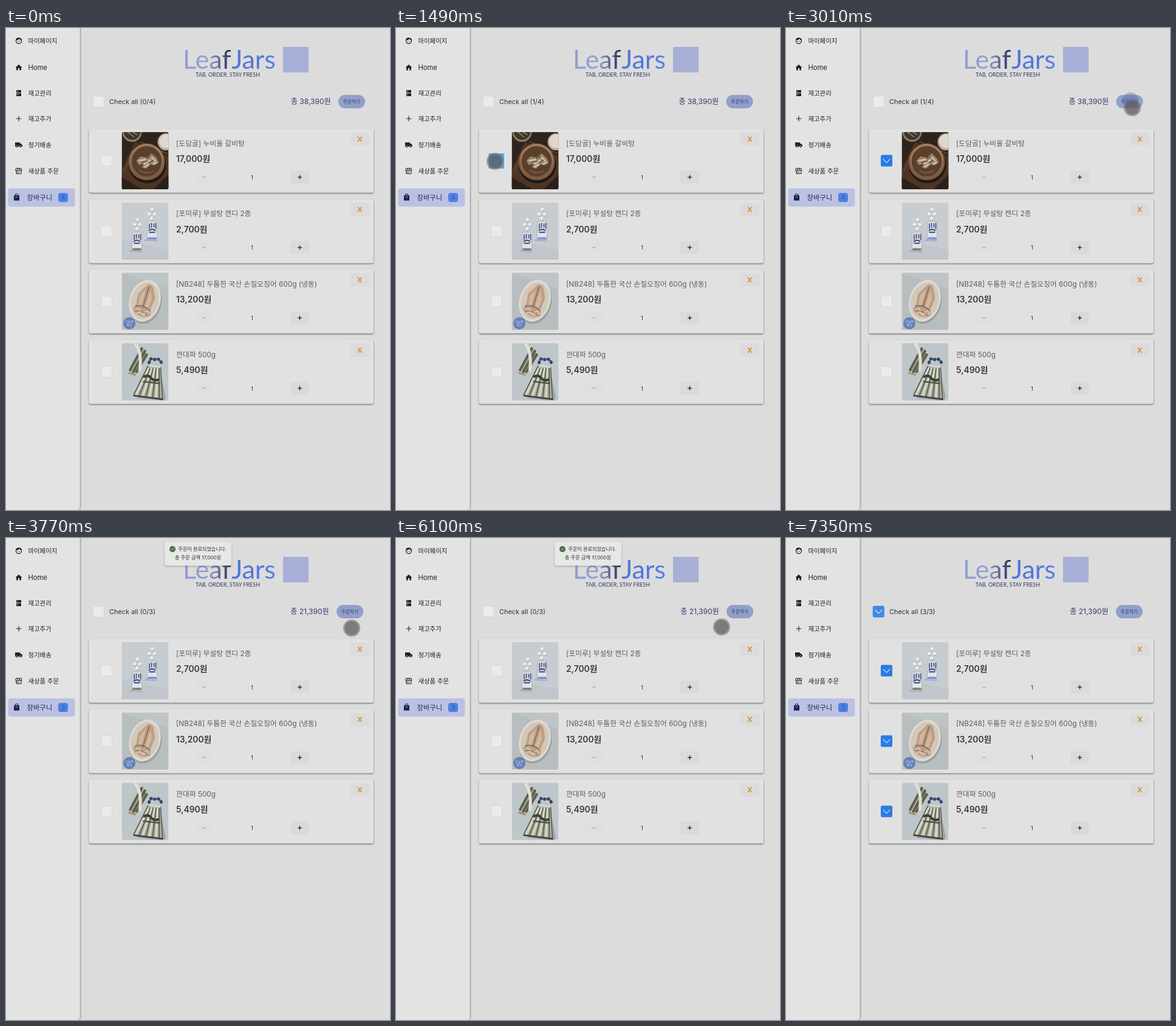
An HTML page for the animation above (8 s loop, 632 by 792 pixels).

```html
<!DOCTYPE html>
<html lang="ko">
<head>
<meta charset="utf-8">
<title>Cart</title>
<style>
  html, body { margin: 0; width: 100%; height: 100%; overflow: hidden; background: #dcdcdc; }
  svg { display: block; width: 100%; height: 100%; }
  text { font-family: Inter, "Noto Sans CJK KR", "Noto Sans CJK", sans-serif; }
  .brand { font-family: Lato, sans-serif; }
  .mid { text-anchor: middle; }
  .line { fill: none; stroke-linecap: round; stroke-linejoin: round; }
</style>
</head>
<body>
<svg id="stage" viewBox="0 0 632 792" xmlns="http://www.w3.org/2000/svg"></svg>
<script>
const LOOP = 8000;
const CHECK_ONE = 1455, ORDER = 3150, TOAST_OUT = 6150, CHECK_ALL = 6560;

const text = (x, y, size, fill, content, extra = '') =>
  `<text x="${x}" y="${y}" font-size="${size}" fill="${fill}" ${extra}>${content}</text>`;
const rect = (x, y, w, h, fill, r = 0, extra = '') =>
  `<rect x="${x}" y="${y}" width="${w}" height="${h}" rx="${r}" fill="${fill}" ${extra}/>`;
const circle = (x, y, r, fill, extra = '') =>
  `<circle cx="${x}" cy="${y}" r="${r}" fill="${fill}" ${extra}/>`;
const path = (d, stroke, width, extra = '') =>
  `<path class="line" d="${d}" stroke="${stroke}" stroke-width="${width}" ${extra}/>`;
const shape = (d, fill) => `<path d="${d}" fill="${fill}" fill-rule="evenodd"/>`;
const group = (x, y, content, turn = 0) =>
  `<g transform="translate(${x} ${y}) rotate(${turn})">${content}</g>`;

const checkbox = (x, y, name, fill) =>
  rect(x, y, 18, 18, '#ebebeb', 2, 'stroke="#d2d2d2" stroke-width=".8"') +
  `<g id="${name}">${rect(x - .5, y - .5, 19, 19, fill, 2.5)}` +
  path(`M${x + 3.5} ${y + 6.5}l5.5 5.5 5.5-5.5`, '#cfe0f6', 1.2) + '</g>';

// Sidebar icons, each centred on the origin.
const INK = '#222';
const wheel = x => circle(x, 3, 1.6, INK, 'stroke="#e2e2e2" stroke-width=".6"');
const icons = {
  face: circle(0, 0, 4.6, 'none', `stroke="${INK}" stroke-width="1.2"`) +
    shape('M-4.5-1Q0-1 1-3.5Q2-1 4.5-1V-3L1-5H-2L-4.5-3Z', INK) +
    circle(-1.7, 1, .7, INK) + circle(1.7, 1, .7, INK),
  home: shape('M-5.5 0L0-5L5.5 0H4V4.5H1.2V1H-1.2V4.5H-4V0Z', INK),
  fridge: shape('M-4-5H4V-.8H-4ZM-4 .2H4V5H-4ZM-2.5-3.8V-2H-1.5V-3.8ZM-2.5 1.2V3.2H-1.5V1.2Z', INK),
  plus: path('M-4 0H4M0-4V4', INK, 1.1),
  truck: shape('M-6-4H2V-2H4L6 .5V3H-6Z', INK) + wheel(-3) + wheel(3),
  store: path('M-4-4.5H4L5-1H-5ZM-4-1V4.5H4V-1M-1.5-4V-1M1.5-4V-1M-4 2H1', INK, 1),
  bag: shape('M-4.5-3H4.5V5.5H-4.5Z', '#1d2347') + path('M-2-3V-4.5Q0-6.5 2-4.5V-3', '#1d2347', 1.2) +
    path('M-2-1Q0 2 2-1', '#bbc1e3', .9),
};

const sidebar = () => {
  const items = [['face', '마이페이지', 21], ['home', 'Home', 65], ['fridge', '재고관리', 107],
    ['plus', '재고추가', 149], ['truck', '정기배송', 192], ['store', '새상품 주문', 235]];
  return rect(-10, -10, 131.5, 802, '#e3e3e3', 5, 'filter="url(#sideShadow)"') +
    items.map(([icon, label, y]) => group(21, y, icons[icon]) +
      (label === 'Home' ? text(36.5, y + 4, 11.2, INK, label)
        : text(36.5, y + 4, 10.4, INK, label, 'font-weight="500"'))).join('') +
    rect(3.5, 263.5, 110, 30, '#bbc1e3', 4) + group(17.5, 278, icons.bag) +
    text(34.5, 282.5, 11.3, '#252b55', '장바구니', 'font-weight="500"') +
    rect(86, 271, 16, 15, '#4d80e4', 4) +
    text(94, 282.2, 10, '#2f559f', '4', 'id="badge" class="mid"');
};

const header = () =>
  text(291, 67, 43, 'url(#leaf)', 'Leaf', 'class="brand"') +
  text(444, 67, 43, 'url(#jars)', 'Jars', 'class="brand" text-anchor="end"') +
  text(365, 80, 9, '#34385c', 'TAB, ORDER, STAY FRESH', 'class="brand mid"') +
  rect(456, 31, 42, 42, '#a7afd6') +
  checkbox(143.3, 112, 'allMark', '#3d89e6') +
  text(170, 125, 10.9, '#303030', '', 'id="count"') +
  `<g id="order">${text(-12.5, 125, 12, '#323d6c', '', 'id="total" text-anchor="end"')}` +
  rect(0, 110, 44, 22, '#919fca', 11) +
  text(22, 124, 7.7, '#303c6b', '주문하기', 'class="mid"') + '</g>';

// Product pictures, 77 by 94 each.
const can = (x, y, rim) => group(x, y,
  shape('M-8 13L-14 17L8 18V13Z', '#a9afb7') +
  rect(-8, -15, 16, 31, '#e2e4e9', 3, 'stroke="#a4abb8" stroke-width=".8"') +
  rect(-7.5, -13, 15, 17, '#d3d8e6', 1) + path('M-4.5-11V-3M-1-12V-5M3-11V-6M6-12V-3', '#434c70', 1.6) +
  path('M-5 0Q0-4 5 0M-4 3H4', '#434c70', 2) + rect(-7.5, 11, 15, 4, rim, 2));

const candies = (x, y) => [[0, 0], [-5, 8], [4, 8], [-1, 15]]
  .map(([dx, dy]) => circle(x + dx + .6, y + dy + 1.4, 2.6, '#adb3ba') + circle(x + dx, y + dy, 2.5, '#eef0f2'))
  .join('');

const soup =
  rect(0, 0, 77, 94, '#2f241d') +
  shape('M0 94V62L22 16L77 40V94Z', '#4d3423') + shape('M0 94V74L34 94ZM52 94L77 70V94Z', '#2b201a') +
  path('M30 16L77 36M4 64L18 32', '#6c4b33', 1.5) +
  circle(17, 0, 16, '#8b7a66') + circle(17, -1, 13.5, '#3d342b') + path('M9-1L20 8M15-2L25 4', '#8f7f68', 1.8) +
  circle(73, 16, 14, '#b7aa98') + circle(73, 15, 11.5, '#ded8ce') +
  circle(42, 53, 31, '#211812') + circle(41, 49, 30, '#7d5b41') + circle(41, 46, 27, '#a07c5c') +
  circle(41, 48, 25, '#5a3f2d') +
  shape('M24 47L31 40L42 42L49 35L57 42L61 50L54 55L48 53L40 60L33 58L36 52L28 54Z', '#9c846a') +
  path('M29 47L39 45M37 52L47 46M49 41L55 47M38 57L44 53M52 52L57 50', '#d3c3aa', 2.6) +
  path('M33 50L42 48M45 50L52 46M41 43L48 40', '#66503c', 1.5) + path('M30 63Q40 70 52 64', '#7b5b41', 2);

const candy =
  rect(0, 0, 77, 94, '#c7ccd1') + shape('M0 94V60L77 78V94Z', '#c0c6cc') +
  candies(26, 28) + candies(50, 11) + can(25, 64, '#7d8474') + can(50, 46, '#7f95d6');

const squid =
  rect(0, 0, 77, 94, '#b8bdbf') + shape('M0 0H77V26Z', '#bfc4c6') +
  group(38, 46,
    '<ellipse cx="2" cy="3" rx="26" ry="35" fill="#9a9fa1"/><ellipse rx="25.5" ry="35" fill="#dedad2"/>' +
    '<ellipse rx="22.5" ry="31" fill="#d2c8ba"/>' +
    shape('M-3-27Q3-30 7-25L15-9L13 12L16 21L5 27L-8 25L-15 18L-12 9L-14-8Z', '#bc9f86') +
    shape('M-4-20L-10-5L-8 10L-3 9ZM4-20L10-6L9 9L3 9Z', '#d3b79e') +
    path('M0-24V11M-12 13Q0 5 13 14', '#7d6655', 1.5) +
    path('M-10 18Q-5 12-2 19T6 18T12 19M-7 24L-3 20M4 24L7 21', '#e0cdb6', 1.8) +
    path('M-11 21Q0 15 12 22', '#8c715d', 1), 17) +
  circle(12.5, 83, 10, '#637fb9') +
  text(12.5, 82, 5, '#dfe5f2', '오늘의', 'class="mid"') + text(12.5, 88, 5, '#dfe5f2', '특가', 'class="mid"');

const stripe = i => path(`M${44 + i * 2.5} 42L${24 + i * 5.4} ${84 + i * .8}`,
  i % 2 ? '#626852' : '#d9d8cc', i % 2 ? 2.2 : 3);
const onions =
  rect(0, 0, 77, 94, '#bec6ca') +
  path('M14 44L33 9M19 47L38 13M24 47L41 19', '#5c604c', 4.5) +
  path('M16 44L34 12M22 47L39 17', '#878a6c', 1.3) + path('M12 49L22 52', '#ad8f66', 3) +
  path('M23 2Q33 14 30 44', '#e2e0d4', 5) +
  shape('M24 90L70 95L72 88L64 48Z', '#9aa2a6') + shape('M43 36L64 38L68 92L19 85Z', '#aeb0a0') +
  [0, 1, 2, 3, 4, 5, 6, 7].map(stripe).join('') +
  path('M43 38L20 84M64 39L67 91', '#474c42', 1.3) + path('M20 86L67 92', '#3a3d38', 2.5) +
  path('M37 55Q43 51 48 57T60 60', '#3a433e', 4) + path('M36 63L62 66', '#4c5549', 2.5) +
  path('M45 32Q47 22 54 27Q62 23 66 34', '#39466a', 5, 'stroke-dasharray="1 5.5"') +
  path('M46 37L63 39', '#dcdcd4', 2.5);

const products = [
  ['[도담골] 누비올 갈비탕', '17,000원', soup],
  ['[포미루] 무설탕 캔디 2종', '2,700원', candy],
  ['[NB248] 두툼한 국산 손질오징어 600g (냉동)', '13,200원', squid],
  ['깐대파 500g', '5,490원', onions],
];

const card = ([title, price, picture], i) =>
  `<g id="card${i}">` +
  rect(136.5, 0, 468.5, 105, '#e1e1e1', 3, 'filter="url(#cardShadow)"') +
  checkbox(156.5, 43.5, 'mark' + i, '#287ce4') +
  `<g transform="translate(190.5 5.5)" clip-path="url(#photo)">${picture}</g>` +
  text(280, 28.3, 11.8, '#5c5c5c', title) +
  text(280, 54.6, 13.8, '#3a3a3a', price, 'font-weight="600"') +
  rect(311, 69.5, 30, 20, '#dfdfdf', 2) + path('M323.5 79.5H328.5', '#999', 1) +
  text(405, 83.2, 9.5, '#333', '1', 'class="mid"') +
  rect(468, 69, 31, 21, '#dadada', 2) + path('M480.5 79.5H486.5M483.5 76.5V82.5', '#222', 1.3) +
  rect(567, 6.5, 31, 21, '#dbdbdb', 2) + path('M579.5 13.5L585 20.5M585 13.5L579.5 20.5', '#cf9c50', 1.9) + '</g>';

const toast = () => '<g id="toast">' +
  rect(-55, -19.5, 110, 39, '#e7e7e7', 4, 'filter="url(#toastShadow)"') +
  `<g id="tick">${circle(0, 0, 5, '#4a6b43')}${path('M-2 0L-.6 1.5L2.2-1.5', '#dfe8dc', 1)}</g>` +
  text(7, -5.2, 8.1, '#303030', '주문이 완료되었습니다.', 'class="mid"') +
  text(0, 9, 8.1, '#303030', '총 주문 금액 17,000원', 'class="mid"') + '</g>';

const gradient = (id, from, to) =>
  `<linearGradient id="${id}"><stop offset=".55" stop-color="${from}"/><stop offset="1" stop-color="${to}"/></linearGradient>`;
const shadow = (id, dx, dy, blur, opacity) =>
  `<filter id="${id}" x="-5%" y="-10%" width="115%" height="125%">
   <feDropShadow dx="${dx}" dy="${dy}" stdDeviation="${blur}" flood-opacity="${opacity}"/></filter>`;

const stage = document.getElementById('stage');
stage.innerHTML = `<defs>${gradient('leaf', '#929ed1', '#282b57')}${gradient('jars', '#5176d9', '#5d83e6')}` +
  shadow('cardShadow', 0, 1.2, 1.2, .6) + shadow('toastShadow', 0, 1.3, 1.5, .3) +
  shadow('sideShadow', 1, 0, 1.2, .45) +
  `<clipPath id="photo">${rect(0, 0, 77, 94, '#000', 3)}</clipPath></defs>` +
  rect(0, 0, 632, 792, '#dcdcdc') + sidebar() + header() + products.map(card).join('') +
  rect(152.5, 206, 25.5, 25, '#4b9fd8', 0, 'id="tapOne" opacity=".85"') +
  rect(140, 108.5, 111, 25, '#50aedb', 0, 'id="tapAll" opacity=".5"') +
  circle(567, 119, 13, '#5367a5', 'id="tapOrder" opacity=".4"') + toast() +
  `<g id="cursor">${circle(0, 0, 14, '#6e6e6e', 'opacity=".6"')}${circle(0, 0, 11.3, '#505050', 'opacity=".42"')}</g>`;

const part = id => document.getElementById(id);
const show = (id, on) => part(id).setAttribute('display', on ? 'inline' : 'none');
const move = (id, x, y, scale = 1) =>
  part(id).setAttribute('transform', `translate(${x} ${y}) scale(${scale})`);
const within = (t, from, to) => t >= from && t < to;
const clamp = v => Math.min(1, Math.max(0, v));
const smooth = v => v * v * (3 - 2 * v);
const easeOut = v => 1 - (1 - v) ** 3;

const cursorPath = [[1360, 163, 219], [2050, 163, 219], [2800, 567, 119], [2940, 567, 119],
  [3010, 570, 131], [3290, 569, 148], [6030, 569, 148], [6440, 153, 125], [7280, 153, 125]];

function cursorAt(t) {
  const i = Math.max(1, cursorPath.findIndex(p => p[0] > t));
  const [a, b] = [cursorPath[i - 1], cursorPath[i]];
  const k = smooth(clamp((t - a[0]) / (b[0] - a[0])));
  return [a[1] + (b[1] - a[1]) * k, a[2] + (b[2] - a[2]) * k];
}

function drawToast(t) {
  const enter = easeOut(clamp((t - ORDER) / 350));
  const leave = 1 - (1 - clamp((t - TOAST_OUT) / 400)) ** 4;
  const away = t < TOAST_OUT ? 1 - enter : leave;
  const travel = t < TOAST_OUT ? 78 : 58;
  show('toast', within(t, ORDER, TOAST_OUT + 400));
  move('toast', 316, 25.7 - travel * away, 1 - .4 * away);
  part('toast').setAttribute('opacity', t < TOAST_OUT ? 1 - away / 2 : 1 - away);
  move('tick', -42, -7.5, easeOut(clamp((t - ORDER - 100) / 300)));
}

function draw(t) {
  const ordered = t >= ORDER, one = t >= CHECK_ONE && !ordered, all = t >= CHECK_ALL;
  products.forEach((_, i) => {
    show('card' + i, i > 0 || !ordered);
    move('card' + i, 0, 165.6 + 115.6 * (i - ordered));
    show('mark' + i, i === 0 ? one : all);
  });
  show('allMark', all);
  part('badge').textContent = ordered ? 3 : 4;
  part('count').textContent = `Check all (${all ? 3 : one ? 1 : 0}/${ordered ? 3 : 4})`;
  part('total').textContent = ordered ? '총 21,390원' : '총 38,390원';
  move('order', all ? 543 : ordered ? 544 : one ? 543.5 : 547, 0);

  show('tapOne', within(t, 1430, 1640));
  show('tapOrder', within(t, 2880, 3080));
  show('tapAll', within(t, 6440, 6650));
  drawToast(t);

  const visible = within(t, 1360, 7280);
  show('cursor', visible);
  if (visible) move('cursor', ...cursorAt(t));
}

const start = performance.now();
function tick() {
  draw((performance.now() - start) % LOOP);
  requestAnimationFrame(tick);
}
tick();
</script>
</body>
</html>
```
